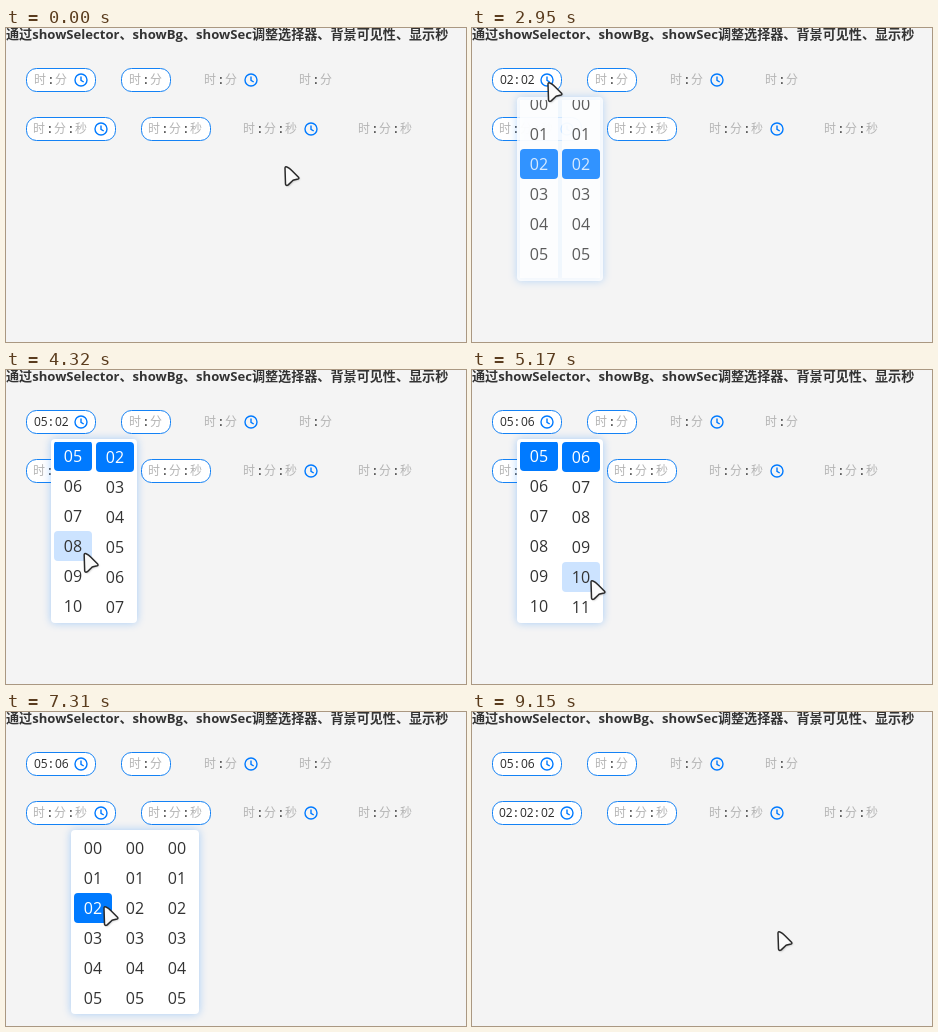
Write an HTML page with a canvas that moves like this. It is 460 px wide and 314 px high and loops after 9200 ms.

```html
<!DOCTYPE html>
<html lang="zh-CN">
<head>
<meta charset="utf-8">
<style>
  html, body { margin: 0; width: 100%; height: 100%; overflow: hidden; background: #f4f4f4; }
  canvas { display: block; }
</style>
</head>
<body>
<canvas width="460" height="314"></canvas>
<script>
const ctx = document.querySelector('canvas').getContext('2d');
const LOOP = 9200, ROW = 30, LIST_HEIGHT = 178;
const FONT = '"Open Sans", "Noto Sans CJK SC", "Noto Sans CJK JP", sans-serif';
const BLUE = '#007aff', INK = '#2b2b2b', HINT = '#b4b4b4';

// Each key: time, x, y of the pointer hotspot
const POINTER = [
  [50, 278, 138], [530, 38, 52], [1340, 38, 52], [1490, 52, 52],
  [2200, 52, 52], [2470, 75, 54], [3590, 75, 54], [3830, 69, 157],
  [3880, 69, 157], [3980, 70, 178], [4260, 70, 178], [4510, 118, 210],
  [5170, 118, 210], [5310, 228, 197], [5500, 228, 197], [5520, 228, 196],
  [5840, 228, 196], [6170, 95, 100], [6740, 95, 100], [7200, 97, 194],
  [7360, 97, 194], [7560, 134, 204], [7860, 134, 204], [7960, 173, 204],
  [8710, 173, 204], [8860, 305, 219]
];

const ramp = (t, start, end) => Math.min(1, Math.max(0, (t - start) / (end - start)));
const ease = (t, start, end) => {
  const p = ramp(t, start, end);
  return p * p * (3 - 2 * p);
};

function pointerAt(t) {
  const next = POINTER.findIndex(key => key[0] > t);
  if (next === 0) return POINTER[0].slice(1);
  if (next < 0) return POINTER.at(-1).slice(1);
  const [t0, x0, y0] = POINTER[next - 1], [t1, x1, y1] = POINTER[next];
  const p = ease(t, t0, t1);
  return [x0 + (x1 - x0) * p, y0 + (y1 - y0) * p];
}

function write(text, x, y, color, size = 12, weight = 400, align = 'left') {
  ctx.font = `${weight} ${size}px ${FONT}`;
  ctx.textAlign = align;
  ctx.fillStyle = color;
  ctx.fillText(text, x, y);
}

function box(x, y, w, h, r, fill, stroke) {
  ctx.beginPath();
  ctx.roundRect(x, y, w, h, r);
  ctx.fillStyle = fill;
  ctx.fill();
  if (!stroke) return;
  ctx.shadowColor = 'transparent';
  ctx.strokeStyle = stroke;
  ctx.lineWidth = 1;
  ctx.stroke();
}

function glow(blur, alpha) {
  ctx.shadowBlur = blur;
  ctx.shadowColor = `rgba(0,122,255,${alpha})`;
}

function clock(x, y) {
  ctx.beginPath();
  ctx.arc(x, y, 6, 0, Math.PI * 2);
  ctx.moveTo(x, y - 3.5);
  ctx.lineTo(x, y + .3);
  ctx.lineTo(x + 2.7, y + 2);
  ctx.strokeStyle = BLUE;
  ctx.lineWidth = 1.4;
  ctx.stroke();
}

function field(x, cy, parts, { width, hasClock, focus = 0, values = [] }) {
  if (width) {
    ctx.save();
    if (focus) glow(11, focus);
    box(x + .5, cy - 11.5, width - 1, 23, 10, '#fff', '#1482f5');
    ctx.restore();
  }
  const left = x + (parts === 3 ? 7 : 8);
  for (let i = 0; i < parts; i++) {
    const value = values[i];
    write(value || '时分秒'[i], left + i * 21, cy + 4, value ? INK : HINT);
    if (i) write(':', left + i * 21 - 4, cy + 4, INK, 12, 600, 'center');
  }
  if (hasClock) clock(x + parts * 20 + 15, cy);
}

// columns: [{ selected, scroll }], scroll in pixels
function popup(x, y, columns, alpha, [px, py]) {
  if (alpha <= 0) return;
  ctx.save();
  ctx.globalAlpha = alpha;
  ctx.save();
  glow(8, .32);
  box(x, y, columns.length * 42 + 2, 184, 4, '#fff');
  ctx.restore();
  const top = y + 3;
  columns.forEach(({ selected, scroll }, i) => {
    const left = x + 3 + i * 42;
    const inside = px >= left && px < left + 38 && py >= top && py < top + LIST_HEIGHT;
    const hovered = inside ? Math.floor((py - top + scroll) / ROW) : -1;
    ctx.save();
    ctx.beginPath();
    ctx.rect(left, top, 38, LIST_HEIGHT);
    ctx.clip();
    box(left, top, 38, LIST_HEIGHT, 0, '#fff');
    const first = Math.floor(scroll / ROW);
    for (let n = first; n < first + 8; n++) {
      const rowY = top + n * ROW - scroll;
      const active = n === selected;
      if (active || n === hovered) box(left, rowY, 38, ROW, 4, active ? BLUE : '#cce3ff');
      write(String(n).padStart(2, '0'), left + 19, rowY + 21, active ? '#fff' : '#333', 16, 400, 'center');
    }
    ctx.restore();
  });
  ctx.restore();
}

function arrow(x, y) {
  ctx.save();
  ctx.translate(x, y);
  ctx.shadowColor = 'rgba(0,0,0,.25)';
  ctx.shadowBlur = 2;
  ctx.shadowOffsetX = ctx.shadowOffsetY = 1;
  const shape = new Path2D('M1 2.2Q1 0 3 1Q5.5 2 7.5 4.2L14.5 11.3Q15.5 12.6 14 13L9.8 14Q8.8 14.3 8 15.2L4.2 18.9Q2 20.3 1.5 18Z');
  ctx.fillStyle = '#fafafa';
  ctx.fill(shape);
  ctx.shadowColor = 'transparent';
  ctx.strokeStyle = '#2a2a2a';
  ctx.lineWidth = 1.5;
  ctx.lineJoin = 'round';
  ctx.stroke(shape);
  ctx.restore();
}

function beam(x, y) {
  const shape = new Path2D(`M${x - 3.5} ${y - 7.5}h7M${x - 3.5} ${y + 7.5}h7M${x} ${y - 7.5}v15`);
  for (const [color, width] of [['#ddd', 3], ['#333', 1.7]]) {
    ctx.strokeStyle = color;
    ctx.lineWidth = width;
    ctx.stroke(shape);
  }
}

function draw(t) {
  const pointer = pointerAt(t), [px, py] = pointer;
  ctx.fillStyle = '#f4f4f4';
  ctx.fillRect(0, 0, 460, 314);
  write('通过showSelector、showBg、showSec调整选择器、背景可见性、显示秒', 0, 11, '#333', 13.1, 700);

  const hour = t < 1340 ? '' : t < 2000 ? '2' : t < 4000 ? '02' : '05';
  const minute = t < 2150 ? '' : t < 2790 ? '2' : t < 4720 ? '02' : '06';
  const focus = ramp(t, 720, 890) * (1 - ramp(t, 2790, 2930));
  field(20, 52, 2, { width: 70, hasClock: true, focus, values: [hour, minute] });
  field(115, 52, 2, { width: 50 });
  field(190, 52, 2, { hasClock: true });
  field(285, 52, 2, {});

  const values = t < 8160 ? [] : ['02', '02', '02'];
  field(20, 101, 3, { width: 90, hasClock: true, values });
  field(135, 101, 3, { width: 70 });
  field(230, 101, 3, { hasClock: true });
  field(345, 101, 3, {});

  const opening = 60 * ease(t, 2880, 3140);
  popup(45, 69, [
    { selected: t < 4000 ? 2 : 5, scroll: opening + 91 * ease(t, 4000, 4250) },
    { selected: t < 4720 ? 2 : 6, scroll: opening + 120 * ease(t, 4720, 4970) }
  ], ramp(t, 2790, 2990) - ramp(t, 5670, 5870), pointer);

  const scroll = 60 * ease(t, 8200, 8510);
  popup(65, 118, [7300, 7660, 8160].map(click => ({ selected: t < click ? -1 : 2, scroll })),
    ramp(t, 6440, 6640) - ramp(t, 8940, 9140), pointer);

  const overText = t < 2600 && py > 42 && py < 62 && (px > 28 && px < 42 || px > 50 && px < 63);
  (overText ? beam : arrow)(px, py);
}

function tick() {
  draw(performance.now() % LOOP);
  requestAnimationFrame(tick);
}
tick();
</script>
</body>
</html>
```
